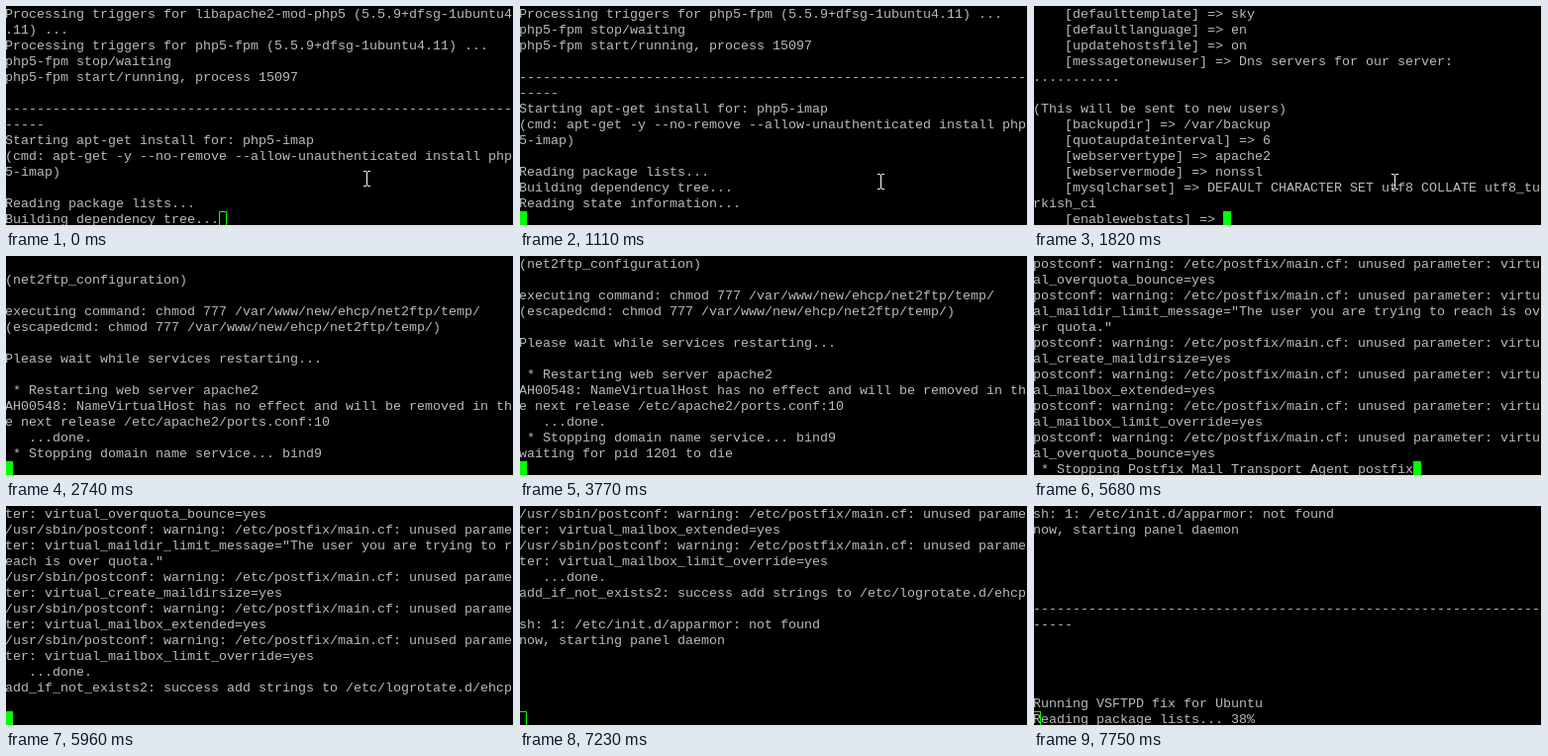
Recreate the animation shown at these times as an HTML page with a canvas. Size 513 by 225 pixels, loop 8 s.

```html
<!DOCTYPE html>
<html lang="en">
<head>
<meta charset="utf-8">
<title>Terminal install log</title>
<style>
  html, body { margin: 0; width: 100%; height: 100%; overflow: hidden; background: #000; }
  canvas { display: block; }
</style>
</head>
<body>
<canvas id="stage" width="513" height="225"></canvas>
<script>
const ctx = document.getElementById('stage').getContext('2d');
const LOOP = 8000, ROWS = 14, CELL_W = 8, CELL_H = 16;
const RULE = '-'.repeat(69);

const log = [];
const screens = [];

// Appends lines to the scrollback, wrapped at 64 columns.
function print(...lines) {
  for (const line of lines) log.push(...(line.match(/.{1,64}/g) || ['']));
}

// Records what the terminal shows from the given time on.
function show(time, { prompt = '', col = prompt.length, hollow = false, mouseY = 0 } = {}) {
  const rows = [...log.slice(1 - ROWS), prompt];
  screens.push({ time, rows, col, hollow, mouseY });
}

const setting = (key, value) => `    [${key}] => ${value}`;

const PARAMS = {
  message: 'maildir_limit_message="The user you are trying to reach is over quota."',
  size: 'create_maildirsize=yes',
  extended: 'mailbox_extended=yes',
  override: 'mailbox_limit_override=yes',
  bounce: 'overquota_bounce=yes'
};

function warn(program, ...keys) {
  for (const key of keys) {
    print(`${program}: warning: /etc/postfix/main.cf: unused parameter: virtual_${PARAMS[key]}`);
  }
}

// Package installation
print(
  'Processing triggers for libapache2-mod-php5 (5.5.9+dfsg-1ubuntu4.11) ...',
  'Processing triggers for php5-fpm (5.5.9+dfsg-1ubuntu4.11) ...',
  'php5-fpm stop/waiting',
  'php5-fpm start/running, process 15097',
  '', RULE,
  'Starting apt-get install for: php5-imap',
  '(cmd: apt-get -y --no-remove --allow-unauthenticated install php5-imap)',
  '',
  'Reading package lists...'
);
show(0, { prompt: 'Building dependency tree...', hollow: true, mouseY: 167 });
print('Building dependency tree...', 'Reading state information...');
show(150, { hollow: true, mouseY: 170 });
show(1110, { mouseY: 170 });
print(
  'php5-imap is already the newest version.',
  '0 upgraded, 0 newly installed, 0 to remove and 0 not upgraded.'
);
show(1260, { mouseY: 170 });

// Panel settings
print('', RULE, 'Loading panel configuration', '', 'Array', '(');
show(1690, { prompt: setting('defaulttemplate', ''), mouseY: 170 });
print(
  setting('defaulttemplate', 'sky'),
  setting('defaultlanguage', 'en'),
  setting('updatehostsfile', 'on'),
  setting('messagetonewuser', 'Dns servers for our server:'),
  '...........',
  '',
  '(This will be sent to new users)',
  setting('backupdir', '/var/backup'),
  setting('quotaupdateinterval', '6'),
  setting('webservertype', 'apache2'),
  setting('webservermode', 'nonssl'),
  setting('mysqlcharset', 'DEFAULT CHARACTER SET utf8 COLLATE utf8_turkish_ci')
);
show(1820, { prompt: setting('enablewebstats', ''), mouseY: 170 });
print(setting('enablewebstats', 'on'), setting('enablewildcarddomain', 'on'), ')', '');
show(2090, { prompt: 'executing command: ', mouseY: 170 });
print('executing command: ', '', '(net2ftp_configuration)');
show(2210, { mouseY: 170 });

// Service restarts
const CHMOD = 'chmod 777 /var/www/new/ehcp/net2ftp/temp/';
print(
  '',
  `executing command: ${CHMOD}`,
  `(escapedcmd: ${CHMOD})`,
  '',
  'Please wait while services restarting...',
  '',
  ' * Restarting web server apache2',
  'AH00548: NameVirtualHost has no effect and will be removed in the next release /etc/apache2/ports.conf:10',
  '   ...done.',
  ' * Stopping domain name service... bind9'
);
show(2740);
print('waiting for pid 1201 to die');
show(3770);
print('   ...done.');
show(4800);

// Mail server warnings
print(' * Starting domain name service... bind9');
warn('postconf', 'override', 'bounce');
show(4950);
warn('postconf', 'message', 'size', 'extended', 'override', 'bounce');
show(5100);
warn('postconf', 'message', 'size');
show(5250);
warn('postconf', 'extended', 'override', 'bounce');
show(5680, { prompt: ' * Stopping Postfix Mail Transport Agent postfix' });
print(' * Stopping Postfix Mail Transport Agent postfix', '   ...done.');
show(5810, { prompt: ' * Starting Postfix Mail Transport Agent postfix' });
print(' * Starting Postfix Mail Transport Agent postfix');
warn('/usr/sbin/postconf', 'bounce', 'message', 'size', 'extended', 'override');
print('   ...done.', 'add_if_not_exists2: success add strings to /etc/logrotate.d/ehcp', '');
show(5960);

// Daemon start
print('sh: 1: /etc/init.d/apparmor: not found', 'now, starting panel daemon', '', '', '', '');
show(7230, { hollow: true });
print(RULE, '', '', '', '', 'Running VSFTPD fix for Ubuntu');
for (const [time, percent] of [[7500, 36], [7750, 38]]) {
  show(time, { prompt: `Reading package lists... ${percent}%`, col: 0, hollow: true });
}

function drawCursor({ col, hollow }) {
  const x = col * CELL_W - 1, y = (ROWS - 1) * CELL_H;
  ctx.fillStyle = ctx.strokeStyle = '#00ff00';
  if (hollow) ctx.strokeRect(x + 0.5, y + 0.5, CELL_W - 1, CELL_H - 1);
  else ctx.fillRect(x, y, CELL_W, CELL_H);
}

function drawMouse(y) {
  ctx.fillStyle = '#fff';
  for (const barY of [y, y + 15]) {
    ctx.fillRect(361, barY, 3, 1);
    ctx.fillRect(365, barY, 3, 1);
  }
  ctx.fillRect(364, y + 1, 1, 14);
}

function drawWindowEdge() {
  ctx.fillStyle = '#e3e3e3';
  ctx.fillRect(0, 222, 513, 3);
  ctx.fillRect(512, 0, 1, 225);
}

function draw(screen) {
  ctx.fillStyle = '#000';
  ctx.fillRect(0, 0, 513, 225);
  ctx.font = '13.333px "Liberation Mono", monospace';
  ctx.fillStyle = '#bbb';
  screen.rows.forEach((row, i) => ctx.fillText(row, -1, i * CELL_H + 12));
  drawCursor(screen);
  if (screen.mouseY) drawMouse(screen.mouseY);
  drawWindowEdge();
}

function tick() {
  const time = performance.now() % LOOP;
  draw(screens.findLast(screen => screen.time <= time));
  requestAnimationFrame(tick);
}
tick();
</script>
</body>
</html>
```
